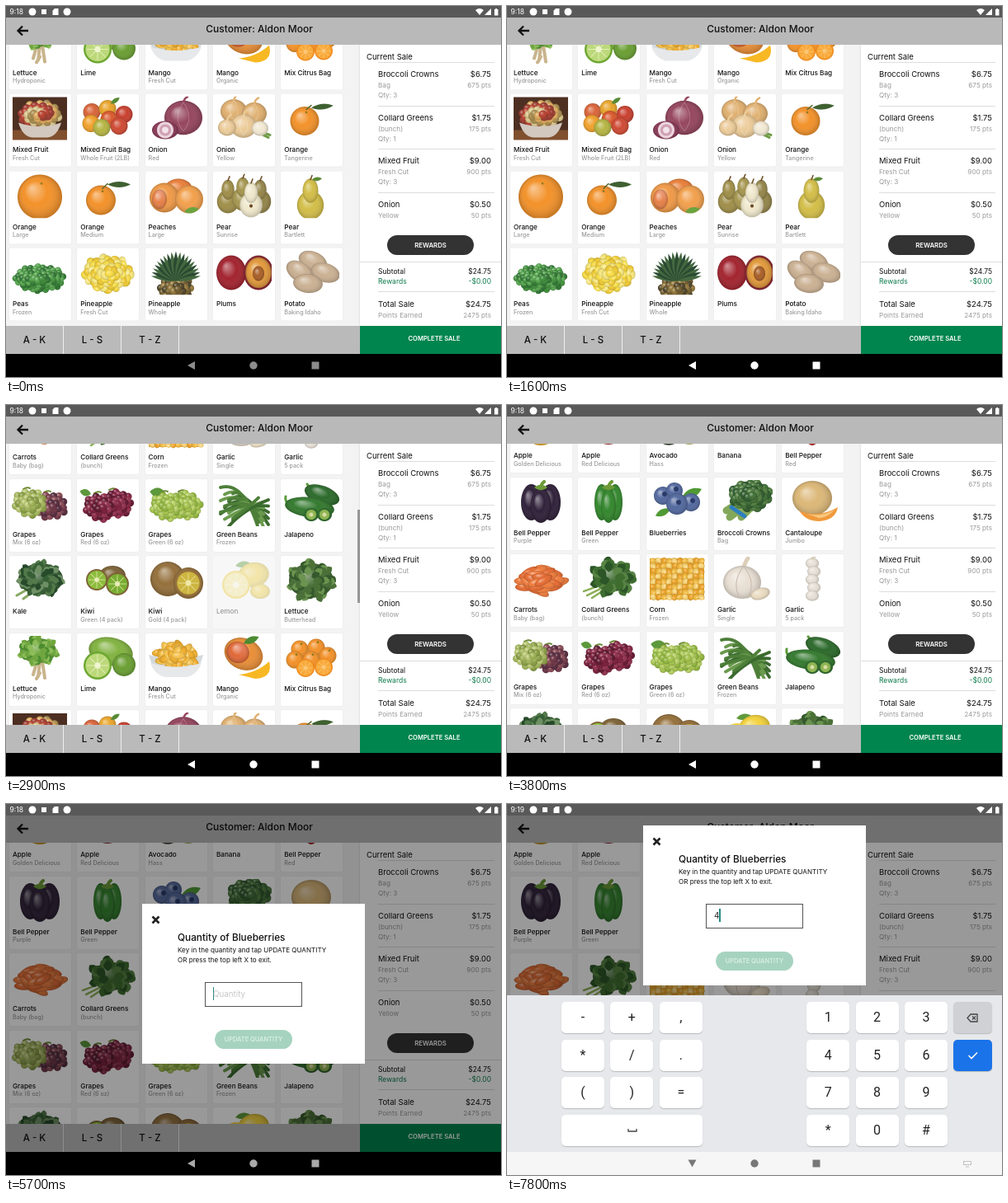
These frames come from a looping animation (600x450 px, 8 s). An HTML page with a canvas:

```html
<!DOCTYPE html>
<html lang="en">
<head>
<meta charset="utf-8">
<title>Produce sale</title>
<style>
html, body { margin: 0; width: 100%; height: 100%; overflow: hidden; }
#stage { position: relative; width: 600px; height: 450px; overflow: hidden; background: #f3f3f3; font-family: Inter, sans-serif; color: #111; }
#stage div, #stage svg, #stage canvas, .t { position: absolute; }
.t { line-height: 0; white-space: nowrap; }
.r { transform: translateX(-100%); }
.c { transform: translateX(-50%); }
.m { font-weight: 500; }
.b { font-weight: 600; }
.gray { color: #9a9a9a; }
.green { color: #0b7a4b; }
.white { color: #fff; }
.card { width: 75px; height: 88px; background: #fff; border-radius: 2px; box-shadow: 0 0 2px #0001; }
.card canvas { left: 3px; top: 3px; width: 68px; height: 54px; }
.key { height: 38px; background: #fff; border-radius: 5px; box-shadow: 0 1px 1px #0003; font: 16px/38px Roboto, sans-serif; text-align: center; color: #222; }
#shade { left: 0; top: 14px; width: 600px; height: 408px; background: #0006; }
#modal { left: 165px; top: 121px; width: 270px; height: 194px; background: #fff; }
#field { left: 76px; top: 95px; width: 116px; height: 28px; border: 1px solid #555; }
#caret { top: 101px; width: 1.5px; height: 16px; background: #23897f; }
#imeClip { left: 0; top: 232px; width: 600px; height: 190px; overflow: hidden; }
#ime { width: 600px; height: 190px; background: #e7e8eb; }
</style>
</head>
<body>
<div id="stage">
  <div id="grid"></div>
  <div id="bar" style="left:426px;width:2.5px;height:113px;background:#999"></div>
  <div style="left:429px;top:46px;width:171px;height:342px;background:#fff;box-shadow:0 0 3px #0002"></div>
  <div style="left:0;top:388px;width:429px;height:34px;background:#bababa"></div>
  <div style="left:429px;top:388px;width:171px;height:34px;background:#00854e"></div>
  <div style="left:0;top:14px;width:600px;height:32.5px;background:#b9b9b9"></div>
  <div id="labels"></div>
  <svg width="600" height="450">
    <path d="M0 0H600V14H0z" fill="#595959"/>
    <g fill="#fff">
      <circle cx="32" cy="7" r="4.5"/><path d="M43 4h6v6h-6zM59 3h4.500v8h-7V5.500z"/><circle cx="74" cy="7" r="4.5"/>
      <path d="M569 5q5-4 10 0l-5 6zM588 3v8h-8zM592 4h1.200V3h2v1h1.300v7.500h-4.500z"/>
    </g>
    <path d="M27 30H15M20 24.500L14.500 30L20 35.500" fill="none" stroke="#111" stroke-width="2.3"/>
  </svg>
  <div id="shade"></div>
  <div id="modal">
    <svg width="40" height="40"><path d="M12.500 15.500l8 8m0-8l-8 8" stroke="#222" stroke-width="2.6"/></svg>
    <div id="field"></div>
    <div style="left:88px;top:153px;width:94px;height:23px;border-radius:12px;background:#a6d3bf"></div>
    <div id="caret"></div>
  </div>
  <div id="imeClip"><div id="ime"></div></div>
  <svg width="600" height="450">
    <path id="nav" d="M0 422H600V450H0z"/>
    <g id="icons">
      <path id="back" d="M229 431v10l-9-5z"/><circle cx="300" cy="436" r="4.700"/><path d="M370.500 431.500h9v9h-9z"/>
    </g>
    <path id="imeIcon" d="M553.500 433.500h9v4h-9zM556 440h4" fill="none" stroke="#aaa" stroke-dasharray="1.500 .7"/>
  </svg>
  <div id="clockBox"></div>
</div>
<script>
const $ = id => document.getElementById(id);

function add(parent, tag, cls, css, content = '') {
  const e = document.createElement(tag);
  e.className = cls;
  e.style.cssText = css;
  e.textContent = content;
  parent.append(e);
  return e;
}
const text = (parent, x, y, size, str, cls = '') =>
  add(parent, 'span', 't ' + cls, `left:${x}px;top:${y}px;font-size:${size}px`, str);

// Drawing helpers for the produce pictures; each picture is centred on 0,0.
let g;
const TAU = Math.PI * 2;
function at(x, y, a, draw) {
  g.save(); g.translate(x, y); g.rotate(a); draw(); g.restore();
}
function ball(x, y, rx, ry, color, a = 0) {
  at(x, y, a, () => {
    g.scale(rx, ry);
    const shade = g.createRadialGradient(-.35, -.4, .05, 0, 0, 1);
    shade.addColorStop(0, '#fff7'); shade.addColorStop(.5, '#fff0'); shade.addColorStop(1, '#0003');
    g.beginPath(); g.arc(0, 0, 1, 0, TAU);
    g.fillStyle = color; g.fill();
    g.fillStyle = shade; g.fill();
  });
}
function disc(x, y, r, color) {
  g.beginPath(); g.arc(x, y, r, 0, TAU); g.fillStyle = color; g.fill();
}
function shape(d, color) { g.fillStyle = color; g.fill(new Path2D(d)); }
function line(d, color, w) {
  g.strokeStyle = color; g.lineWidth = w; g.lineCap = 'round'; g.stroke(new Path2D(d));
}
function leaf(x, y, len, a, color, w = .4) {
  at(x, y, a, () => shape(`M0 0Q${len / 2} ${-len * w} ${len} 0Q${len / 2} ${len * w} 0 0`, color));
}
function bunch(n, x, y, rx, ry, draw) {
  for (let i = n - 1; i >= 0; i--) {
    const r = Math.sqrt((i + .5) / n), a = i * 2.4;
    draw(x + rx * r * Math.cos(a), y + ry * r * Math.sin(a), i, a);
  }
}
const berries = (n, x, y, rx, ry, size, ...colors) =>
  bunch(n, x, y, rx, ry, (px, py, i) => ball(px, py, size, size, colors[i % colors.length]));
function greens(n, x, y, rx, ry, len, ...colors) {
  ball(x, y, rx, ry, colors[0]);
  bunch(n, x, y, rx * .85, ry * .85, (px, py, i, a) => leaf(px, py, len, a + i % 3 * .5, colors[i % colors.length], .8));
}
function slice(x, y, r, rind, flesh, core) {
  disc(x, y, r, rind); disc(x, y, r * .86, flesh);
  for (let i = 0; i < 8; i++) at(x, y, i * TAU / 8, () => line(`M0 0H${r * .75}`, core, .7));
  disc(x, y, r * .22, core);
}
function pepper(color, w) {
  ball(-w * .48, 0, w * .52, 22, color); ball(w * .48, 0, w * .52, 22, color); ball(0, 4, w * .52, 21, color);
  line('M0 -17Q0 -22 4 -25', '#6c9a38', 4);
  leaf(-8, -18, 16, 0, '#6c9a38');
}
function pear(x, y, s, color) {
  ball(x, y + 6 * s, 12 * s, 13 * s, color); ball(x, y - 7 * s, 7 * s, 11 * s, color);
  line(`M${x} ${y - 17 * s}l2 -5`, '#6b4a25', 1.5);
}
function grapes(x, y, n, ...colors) {
  line(`M${x - 8} ${y - 17}q5 -3 8 -1`, '#6c8a35', 2);
  berries(n, x, y, 19, 15, 4.5, ...colors);
}
function onions(color, ...spots) {
  for (const [x, y, r] of spots) {
    ball(x, y, r, r * .9, color);
    line(`M${x} ${y - r * .8}q1 -5 5 -7`, color, 2.5);
    line(`M${x} ${y - r * .8}q${-r * .6} ${r * .8} 0 ${r * 1.5}m0 ${-r * 1.5}q${r * .6} ${r * .8} 0 ${r * 1.5}`, '#fff4', .8);
  }
}
function bowl(y, w, color) {
  shape(`M${-w} ${y}Q0 ${y + 9} ${w} ${y}Q${w * .8} 22 ${w * .35} 23H${-w * .35}Q${-w * .8} 22 ${-w} ${y}`, color);
}
function orange(x, y, r) {
  ball(x, y, r, r, '#f3922a');
  disc(x + 2, y - r * .6, 1.3, '#8a7a25');
}

const items = [
  ['Apple', 'Golden Delicious', () => ball(0, 2, 22, 23, '#eeb02a')],
  ['Apple', 'Red Delicious', () => ball(0, 2, 20, 22, '#a81f28')],
  ['Avocado', 'Hass', () => { ball(-8, 3, 18, 22, '#34452b', .3); ball(15, 7, 15, 17, '#c8c565'); ball(15, 10, 7, 7, '#7a4e29'); }],
  ['Banana', '', () => line('M-26 -10Q0 18 26 -14', '#f4cf3a', 11)],
  ['Bell Pepper', 'Red', () => pepper('#c4201d', 20)],
  ['Bell Pepper', 'Purple', () => pepper('#30213a', 24)],
  ['Bell Pepper', 'Green', () => pepper('#33872d', 17)],
  ['Blueberries', '', () => {
    leaf(6, -6, 26, -.4, '#4f9a35'); leaf(-8, 8, 20, 2.7, '#4f9a35');
    for (const [x, y, r] of [[-17, -8, 11], [-3, -14, 10], [17, 0, 11], [0, 2, 13]]) {
      ball(x, y, r, r, '#53699f'); disc(x + 2, y - 2, 3, '#2b3a68');
    }
  }],
  ['Broccoli Crowns', 'Bag', () => {
    line('M6 0L-18 18M10 4L-4 18M0 -4L-22 10', '#84a85a', 9);
    berries(48, 7, -8, 23, 16, 5.5, '#3f6f35', '#2d5a2b', '#517f40');
    line('M-16 6L0 17', '#2d7fc0', 5);
  }],
  ['Cantaloupe', 'Jumbo', () => {
    ball(0, -5, 24, 21, '#dcb878');
    shape('M-16 10Q6 20 31 6Q28 22 8 23Q-8 23 -16 10', '#f09a3c');
    shape('M-6 14Q12 18 27 9Q18 19 8 19Z', '#f8c77c');
  }],
  ['Carrots', 'Baby (bag)', () => bunch(24, 0, 2, 24, 14, (x, y, i) => ball(x, y, 12, 5, i % 2 ? '#f07c3c' : '#e66a30', i % 5 * .25 - .5))],
  ['Collard Greens', '(bunch)', () => {
    line('M-30 15L0 4M-26 20L2 6M-20 23L6 6', '#8cae58', 2.5);
    greens(30, 5, -2, 24, 17, 13, '#3f6d30', '#2c5627', '#588444');
  }],
  ['Corn', 'Frozen', () => {
    shape('M-33 -25H33V25H-33z', '#e5a52c');
    for (let i = 0; i < 80; i++) ball(-29 + i % 10 * 6.5, -22 + (i / 10 | 0) * 6.3, 4.2, 3.4, ['#f3b93b', '#f8d273', '#eda226'][i * 7 % 3], i);
  }],
  ['Garlic', 'Single', () => {
    line('M-2 -10Q0 -20 4 -25', '#dccfb8', 5);
    ball(-3, 4, 23, 20, '#e9e0d4');
    line('M-2 -14Q-16 4 -6 23M0 -14Q14 4 4 23', '#c9b8aa', 1);
    ball(19, 18, 12, 7, '#eadcc2', -.3);
  }],
  ['Garlic', '5 pack', () => { for (let i = 0; i < 5; i++) ball(i % 2 * 2, -19 + i * 9.8, 8, 6.5, '#e7e0d6'); line('M0 -25l3 -2', '#d8ccb8', 3); }],
  ['Grapes', 'Mix (6 oz)', () => { grapes(13, 3, 32, '#6d3344', '#8a4a55', '#54293c'); grapes(-12, -1, 34, '#9fb455', '#b8c770', '#869b40'); }],
  ['Grapes', 'Red (6 oz)', () => { leaf(-20, -12, 14, 3.4, '#5d983c', .6); grapes(10, 0, 40, '#84203f', '#641530', '#93304e'); grapes(-8, 4, 34, '#7a1c3a', '#5c142c', '#93304e'); }],
  ['Grapes', 'Green (6 oz)', () => { leaf(-12, -12, 20, 3.3, '#5d983c', .6); grapes(11, 2, 38, '#a4c44a', '#8db33a', '#b7d264'); grapes(-10, 3, 34, '#a4c44a', '#8db33a', '#b7d264'); }],
  ['Green Beans', 'Frozen', () => {
    for (let i = 0; i < 16; i++) {
      const y = -20 + i * 2.5;
      line(`M${-28 + i % 4 * 5} ${y + i % 3 * 6}Q0 ${y - 8} ${18 + i % 3 * 6} ${10 - y}`, ['#4d7f39', '#6a9a4d', '#3b6a2e'][i % 3], 3.8);
    }
  }],
  ['Jalapeno', '', () => {
    line('M-29 -1q-3 -4 -2 -8M2 -18q-4 -2 -7 -6', '#5d9a3d', 3);
    ball(13, -11, 22, 11, '#2c6a2b', .35); ball(-2, 4, 30, 12, '#347a2f', .12);
    for (const x of [0, 16]) { ball(x, 13, 9, 8, '#2f6e2c'); disc(x, 13, 6, '#8fb552'); disc(x, 13, 2.5, '#d9dca4'); }
  }],
  ['Kale', '', () => { line('M-28 18L4 0M-20 22L8 2', '#86a861', 3); greens(60, 1, -2, 27, 19, 9, '#375f35', '#54794b', '#264a2a', '#6f9065'); }],
  ['Kiwi', 'Green (4 pack)', () => {
    ball(6, -6, 16, 12, '#7d6337');
    slice(-13, -1, 13, '#7d6337', '#8cbc3c', '#e9edb8'); slice(12, 4, 14, '#7d6337', '#78ad31', '#e9edb8');
  }],
  ['Kiwi', 'Gold (4 pack)', () => { ball(-10, -2, 21, 21, '#95703c', .3); ball(15, 3, 18, 19, '#95703c'); slice(15, 3, 16, '#95703c', '#cdb540', '#f0e8a8'); }],
  ['Lemon', '', () => { leaf(-10, -18, 18, -.2, '#5f9a3c'); ball(12, -7, 19, 15, '#f3d23c', -.2); slice(-9, 5, 17, '#f0cf3a', '#f7e98f', '#fffbe0'); ball(20, 13, 12, 9, '#f3d23c'); }],
  ['Lettuce', 'Butterhead', () => greens(50, 0, 0, 27, 21, 11, '#4a7038', '#6b9450', '#35592c')],
  ['Lettuce', 'Hydroponic', () => {
    line('M0 4L-2 22M3 4L6 24M-4 6L-8 20M0 18l-4 7', '#c9b48c', 4);
    greens(44, -2, -9, 22, 15, 9, '#6fa63f', '#8dbc5a', '#4c8c30');
  }],
  ['Lime', '', () => { ball(4, -8, 27, 17, '#82b341', .2); ball(20, 8, 14, 14, '#6a9f33'); slice(-12, 9, 17, '#6ca630', '#bcd97a', '#eef5cf'); }],
  ['Mango', 'Fresh Cut', () => {
    bowl(-4, 33, '#d5d9dc');
    bunch(30, 0, -3, 23, 13, (x, y, i) => ball(x, y, 9, 4.5, i % 2 ? '#f2ae2a' : '#f7c24a', i));
    bowl(6, 31, '#e6e8ea');
  }],
  ['Mango', 'Organic', () => {
    ball(0, -5, 24, 19, '#ea8f38', .4); ball(-7, -7, 14, 13, '#d9463388', .4);
    leaf(0, -18, 20, -.4, '#4c8a33');
    shape('M-6 20Q16 18 31 4Q36 24 14 25Z', '#f8b824');
  }],
  ['Mix Citrus Bag', '', () => {
    for (const [x, y] of [[-14, -11], [6, -13], [20, -3], [-20, 2], [0, 2]]) orange(x, y, 10.5);
    slice(-7, 12, 11, '#ee8a1e', '#f9a93a', '#fbc878'); slice(15, 11, 11, '#ee8a1e', '#f9a93a', '#fbc878');
  }],
  ['Mixed Fruit', 'Fresh Cut', () => {
    shape('M-33 -26H33V26H-33z', '#4d2f22'); shape('M-33 14H33V26H-33z', '#80502f');
    berries(46, 0, -5, 24, 14, 5, '#b8402e', '#dca85a', '#d9c68a', '#9c3a2f', '#a58a4c');
    bowl(5, 26, '#d2c8bf');
  }],
  ['Mixed Fruit Bag', 'Whole Fruit (2LB)', () => {
    for (const [x, y, c] of [[-19, -8, '#d8643a'], [0, -12, '#e9a52c'], [20, -5, '#c9402f'], [-20, 6, '#f0a12c'], [2, 1, '#d9582c'], [-7, 11, '#b5b544'], [14, 9, '#cf4a34']]) ball(x, y, 10.5, 10.5, c);
    leaf(4, -18, 13, -.6, '#578a35');
  }],
  ['Onion', 'Red', () => { onions('#96465f', [9, -1, 23]); ball(-13, 14, 16, 11, '#8b3a58'); disc(-13, 14, 10, '#ecd6de'); disc(-13, 14, 7, '#cf9fb2'); disc(-13, 14, 4, '#f2e3e8'); }],
  ['Onion', 'Yellow', () => {
    onions('#e0b070', [-12, -9, 16], [13, -6, 15]); onions('#eccb98', [0, 9, 16], [-20, 11, 11]);
    line('M16 14L32 20M16 16L30 23', '#6d9a45', 3); ball(20, 12, 10, 9, '#f1e8d2');
  }],
  ['Orange', 'Tangerine', () => { orange(-8, 3, 17.5); line('M-6 -11L0 -16', '#5a6a30', 1.5); leaf(0, -13, 27, -.1, '#3f6030', .25); }],
  ['Orange', 'Large', () => orange(0, 1, 27)],
  ['Orange', 'Medium', () => { orange(-8, 5, 18); line('M-6 -9L0 -15', '#5a6a30', 1.5); leaf(0, -14, 28, 0, '#3f6030', .25); }],
  ['Peaches', 'Large', () => {
    ball(3, -8, 17, 13, '#e97f3a'); ball(-14, 2, 18, 18, '#f09a48'); ball(16, 4, 17, 17, '#f2a04c');
    ball(-20, 4, 9, 12, '#d9554066'); leaf(10, 19, 18, -.2, '#6ba33f');
  }],
  ['Pear', 'Sunrise', () => { pear(-19, 0, 1.1, '#a08f4a'); pear(20, 0, 1.1, '#94854a'); pear(-1, -3, 1.1, '#a5964f'); pear(9, 4, 1.15, '#f0e8cc'); disc(9, 12, 2, '#6b4a25'); }],
  ['Pear', 'Bartlett', () => { pear(-1, 3, 1.35, '#d3be48'); leaf(1, -20, 12, -.1, '#5d8a35'); }],
  ['Peas', 'Frozen', () => berries(76, 0, 7, 30, 15, 4, '#3f8f3b', '#58a850', '#2e7530')],
  ['Pineapple', 'Fresh Cut', () => bunch(56, 0, 1, 28, 20, (x, y, i) => ball(x, y, 6, 4.8, ['#f8dc44', '#f7e67c', '#f0ca30'][i % 3], i))],
  ['Pineapple', 'Whole', () => {
    berries(40, 0, 20, 19, 16, 4.5, '#6f5a2c', '#94783a', '#4d4225');
    for (let i = 0; i < 19; i++) leaf(0, 10, 36 - Math.abs(i - 9) * .6, -2.95 + i * .153, i % 2 ? '#2a4a32' : '#44683f', .16);
  }],
  ['Plums', '', () => { ball(-15, 0, 18, 21, '#a3242f'); ball(18, 0, 18, 21, '#8e2633'); ball(18, 0, 15.5, 18.5, '#e39a3c'); ball(18, 1, 7, 9, '#a85f28'); }],
  ['Potato', 'Baking Idaho', () => { for (const [x, y, a] of [[2, -14, .4], [-14, -1, .6], [17, 0, .3], [-4, 13, .1]]) ball(x, y, 18, 11.5, '#cbb193', a); }]
];

const cards = items.map(([name, kind, draw], i) => {
  const card = add($('grid'), 'div', 'card', `left:${4 + i % 5 * 82.3}px;top:${(i / 5 | 0) * 93.5}px`);
  const canvas = add(card, 'canvas', '', '');
  canvas.width = 136; canvas.height = 108;
  g = canvas.getContext('2d');
  g.scale(2, 2); g.translate(34, 27);
  draw();
  text(card, 4, 67, 8.2, name, 'm');
  text(card, 4, 77.5, 7.2, kind, 'gray m');
  return card;
});
const cardOf = name => cards[items.findIndex(item => item[0] === name)];

// Fixed labels, sale list and tabs
const labels = $('labels');
text(labels, 307, 28, 12, 'Customer: Aldon Moor', 'c m');
text(labels, 437, 61.5, 9.5, 'Current Sale');
const pair = (y, size, left, right, cls = '') => {
  text(labels, 451, y, size, left, cls);
  text(labels, 588, y, size, right, 'r ' + cls);
};
const rule = (x, y, w) => add(labels, 'div', '', `left:${x}px;top:${y}px;width:${w}px;height:1px;background:#ddd`);
[['Broccoli Crowns', '$6.75', 'Bag', '675 pts', 'Qty: 3'],
 ['Collard Greens', '$1.75', '(bunch)', '175 pts', 'Qty: 1'],
 ['Mixed Fruit', '$9.00', 'Fresh Cut', '900 pts', 'Qty: 3'],
 ['Onion', '$0.50', 'Yellow', '50 pts', '']].forEach(([name, price, kind, points, qty], i) => {
  const y = 83 + i * 52.7;
  rule(451, y - 15, 141);
  pair(y, 9.5, name, price);
  pair(y + 13, 8.2, kind, points, 'gray');
  text(labels, 451, y + 25, 8.2, qty, 'gray');
});
add(labels, 'div', '', 'left:462px;top:278px;width:105px;height:24px;border-radius:12px;background:#333');
text(labels, 514.5, 290, 7.8, 'REWARDS', 'c b white');
rule(429, 310, 171);
pair(322, 8.5, 'Subtotal', '$24.75');
pair(334, 8.5, 'Rewards', '-$0.00', 'green');
rule(451, 346, 141);
pair(362, 9.5, 'Total Sale', '$24.75');
pair(375, 8.2, 'Points Earned', '2475 pts', 'gray');
['A - K', 'L - S', 'T - Z'].forEach((name, i) => {
  text(labels, 34.5 + i * 70, 405, 11.5, name, 'c m');
  add(labels, 'div', '', `left:${69 + i * 70}px;top:388px;width:1px;height:34px;background:#eee`);
});
text(labels, 519, 404, 7.6, 'COMPLETE SALE', 'c b white');
const clock = text($('clockBox'), 4.5, 7, 8.5, '', 'white');

// Dialog
const modal = $('modal');
text(modal, 43, 41, 11.8, 'Quantity of Blueberries', 'm');
text(modal, 43, 56, 8.1, 'Key in the quantity and tap UPDATE QUANTITY');
text(modal, 43, 67.5, 8.1, 'OR press the top left X to exit.');
text(modal, 135, 164.5, 7.4, 'UPDATE QUANTITY', 'c b').style.color = '#d9eee4';
const entry = text(modal, 86, 109.5, 9.8, '');

// Number pad
const key = (x, row, w, label, css = '') =>
  add($('ime'), 'div', 'key', `left:${x}px;top:${8 + row * 45.6}px;width:${w}px;${css}`, label);
['-+,123', '*/.456', '()=789', '   *0#'].forEach((chars, row) => [...chars].forEach((char, i) => {
  if (char !== ' ') key((i < 3 ? 66 : 185) + i * 59.4, row, 52, char);
}));
key(66, 3, 171, '');
key(541, 0, 47, '', 'background:#cfd1d4');
key(541, 1, 47, '', 'background:#1a73e8');
$('ime').insertAdjacentHTML('beforeend', `<svg width="600" height="190" fill="none" stroke="#444" stroke-width="1.3">
  <path d="M147 162v3h10v-3M562 23h8v9h-8l-4-4.500zM564 25.500l4 4m0-4l-4 4"/><path d="M559.500 73l3.500 3.500l7-7" stroke="#fff" stroke-width="1.6"/></svg>`);

const ramp = (t, from, to) => Math.min(1, Math.max(0, (t - from) / (to - from)));
const easeOut = p => 1 - (1 - p) ** 2;
const during = (t, from, to) => t >= from && t < to;

function render(t) {
  // Two flicks; the scroll bar lingers 300 ms after the last one, then fades.
  const scroll = 505.5 - 263.5 * easeOut(ramp(t, 2100, 2650)) - 185 * easeOut(ramp(t, 2920, 3250));
  $('grid').style.transform = `translateY(${51 - scroll}px)`;
  $('bar').style.top = 47 + scroll * .33 + 'px';
  $('bar').style.opacity = t < 2100 ? 0 : 1 - ramp(t, 3550, 3800);
  cardOf('Lemon').style.opacity = during(t, 2800, 3000) ? .4 : 1;
  cardOf('Blueberries').style.opacity = during(t, 5100, 5300) ? .4 : 1;

  const shown = ramp(t, 5250, 5550), raised = easeOut(ramp(t, 6200, 6400));
  $('shade').style.opacity = modal.style.opacity = shown;
  modal.style.transform = `translateY(${-95 * raised}px)`;
  $('ime').style.transform = `translateY(${190 - 190 * raised}px)`;

  const typed = t >= 7400, light = t >= 6200;
  entry.textContent = typed ? '4' : 'Quantity';
  entry.style.color = typed ? '#222' : '#c6c6c6';
  $('caret').style.left = (typed ? 92 : 85.5) + 'px';
  $('caret').style.opacity = t % 1000 >= 500 ? 1 : 0;

  const tone = 140 + 115 * ramp(t, 100, 900);
  $('nav').style.fill = light ? '#f6f6f7' : '#000';
  $('icons').style.fill = light ? '#777' : t > 5300 ? '#aaa' : `rgb(${tone},${tone},${tone})`;
  $('back').setAttribute('transform', light ? 'rotate(-90 224.5 436)' : '');
  $('imeIcon').style.opacity = light ? 1 : 0;
  clock.textContent = light ? '9:19' : '9:18';
}

function tick(now) {
  render(now % 8000);
  requestAnimationFrame(tick);
}
requestAnimationFrame(tick);
</script>
</body>
</html>
```
